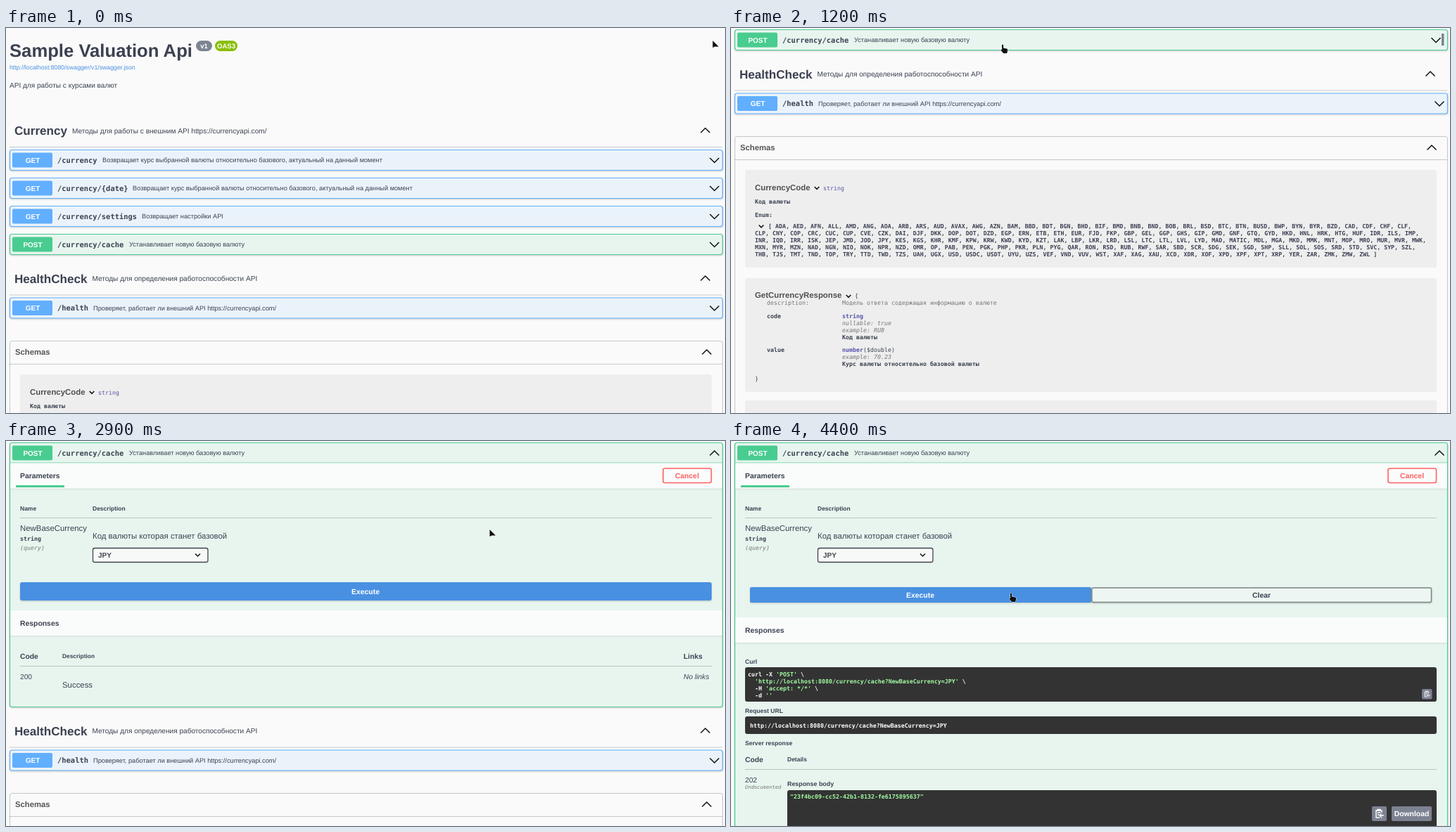
Animation of 1022 by 548 pixels, one loop 7200 ms. Source, as an HTML page:

```html
<!DOCTYPE html>
<html lang="ru">
<head>
<meta charset="utf-8">
<title>API</title>
<style>
html, body { margin: 0; width: 100%; height: 100%; overflow: hidden; background: #fafafa; }
svg { display: block; }
text { font-family: "Liberation Sans", Arial, sans-serif; fill: #3b4151; white-space: pre; text-rendering: geometricPrecision; }
.b { font-weight: 700; }
.i { font-style: italic; }
.m { font-family: "DejaVu Sans Mono", monospace; }
.c { text-anchor: middle; }
.w { fill: #fff; }
.g { fill: #777; }
.p { fill: #55a; }
.s { fill: #a2fca2; }
.chev { fill: none; stroke: #111; stroke-linecap: square; }
.op { stroke-width: 1.2; }
.hr { stroke: #3b4151; stroke-opacity: .28; }
.bar { fill: #fafcfb; filter: drop-shadow(0 1px 1px rgba(0,0,0,.1)); }
.shade { filter: drop-shadow(0 1px 1px rgba(0,0,0,.2)); }
</style>
</head>
<body>
<svg id="stage" width="1022" height="548" viewBox="0 0 1022 548"></svg>
<script>
const BLUE = '#61affe', GREEN = '#49cc90', INK = '#3b4151';
const CODES = ('ADA AED AFN ALL AMD ANG AOA ARB ARS AUD AVAX AWG AZN BAM BBD BDT BGN BHD BIF BMD BNB BND BOB BRL BSD BTC BTN BUSD BWP BYN BYR BZD CAD CDF CHF CLF ' +
  'CLP CNY COP CRC CUC CUP CVE CZK DAI DJF DKK DOP DOT DZD EGP ERN ETB ETH EUR FJD FKP GBP GEL GGP GHS GIP GMD GNF GTQ GYD HKD HNL HRK HTG HUF IDR ILS IMP ' +
  'INR IQD IRR ISK JEP JMD JOD JPY KES KGS KHR KMF KPW KRW KWD KYD KZT LAK LBP LKR LRD LSL LTC LTL LVL LYD MAD MATIC MDL MGA MKD MMK MNT MOP MRO MUR MVR MWK ' +
  'MXN MYR MZN NAD NGN NIO NOK NPR NZD OMR OP PAB PEN PGK PHP PKR PLN PYG QAR RON RSD RUB RWF SAR SBD SCR SDG SEK SGD SHP SLL SOL SOS SRD STD SVC SYP SZL ' +
  'THB TJS TMT TND TOP TRY TTD TWD TZS UAH UGX USD USDC USDT UYU UZS VEF VND VUV WST XAF XAG XAU XCD XDR XOF XPD XPF XPT XRP YER ZAR ZMK ZMW ZWL').split(' ');

// y is the middle of the capitals
const txt = (x, y, size, str, cls = '', more = '') =>
  `<text x="${x}" y="${Math.round(y + size * .36)}" font-size="${size}" class="${cls}" ${more}>${str}</text>`;
const mono = (x, y, str, cls = '') => txt(x, y, 8.3, str, 'm ' + cls);
const box = (x, y, w, h, fill, r = 0, more = '') =>
  `<rect x="${x}" y="${y}" width="${w}" height="${h}" rx="${r}" fill="${fill}" ${more}/>`;
const rule = (x1, x2, y) => `<path class="hr" d="M${x1} ${y}H${x2}"/>`;
const chev = (x, y, dir, w = 6, line = 1.5) =>
  `<path class="chev" stroke-width="${line}" d="M${x - w} ${y - dir * w / 2}l${w} ${dir * w}l${w} ${-dir * w}"/>`;
const group = (id, body) => `<g id="${id}">${body}</g>`;

// lines of codes, each beginning at one of the given codes
function linesFrom(starts) {
  const at = starts.map(s => CODES.indexOf(s));
  return at.map((a, n) => CODES.slice(a, at[n + 1]).join(', ') + (n < at.length - 1 ? ',' : ''));
}

function tag(y, name, x, about) {
  return txt(12, y, 17.1, name, 'b') + txt(x, y, 10.1, about) + chev(994, y - .5, -1) + rule(5, 1018, y + 23.5);
}

function summary(y, verb, color, path, x, about) {
  return box(9, y - 10.5, 57, 21, color, 2) + txt(38, y, 10, verb, 'b c w') +
    txt(73, y, 10.45, path, 'b m') + txt(x, y, 9.23, about);
}

function getOp(y, path, x, about) {
  return box(5.5, y - 14.5, 1013, 29, '#ebf3fa', 3, `class="op shade" stroke="${BLUE}"`) +
    summary(y, 'GET', BLUE, path, x, about) + chev(1007, y + .5, 1);
}

function copyIcon(x, y, size) {
  const k = size / 21;
  return box(x, y, size, size, '#7d8293', 2) +
    `<g transform="translate(${x} ${y}) scale(${k})" fill="none" stroke="#fff" stroke-width="1.4">
     <path d="M14 9V6H6v10h5M8 6V4.5h4V6M8 9h4M8 12h2M17 13h-6m2.5-2.5L11 13l2.5 2.5M14 16v1"/></g>`;
}

const select = (y, ink, fill) => box(123.5, y - 10, 163.5, 20, fill, 2.5, `stroke="${ink}" stroke-width="1.3"`) +
  txt(131, y, 10, 'JPY', 'b', `style="fill:${ink}"`) + chev(272.5, y, 1, 3);

const bar = (y, title) => box(6, y - 18, 1012, 36, '', 0, 'class="bar"') + txt(20, y, 10.4, title, 'b');

function models() {
  const gray = '#eee', list = linesFrom(['ADA', 'CLP', 'INR', 'MXN', 'THB']);
  list[0] = '[ ' + list[0];
  list[4] += ' ]';
  return box(5.5, 445.5, 1013, 700, 'none', 3, 'class="hr"') + txt(13, 460.5, 11.3, 'Schemas', 'b', 'style="fill:#555"') +
    chev(996, 461, -1) + rule(5, 1018, 478.5) +
    box(20, 493, 983, 139, gray, 3) + txt(34, 517.5, 11.4, 'CurrencyCode', 'b', 'style="fill:#505050"') +
    chev(122, 519, 1, 2.8) + mono(131, 519, 'string', 'p') + mono(34, 538, 'Код валюты', 'b') + mono(34, 557, 'Enum:', 'b') +
    chev(43, 573.5, 1, 2.8) + list.map((l, n) => mono(n ? 34 : 53, 573 + n * 10, l, 'b')).join('') +
    box(20, 647, 983, 162, gray, 3) + txt(34, 671, 11.4, 'GetCurrencyResponse', 'b', 'style="fill:#505050"') +
    chev(167, 673, 1, 2.8) + mono(176, 672.5, '{') +
    mono(51, 682.5, 'description:', 'g') + mono(158, 682.5, 'Модель ответа содержащая информацию о валюте', 'g') +
    mono(51, 701, 'code', 'b') + mono(158, 701, 'string', 'p b') + mono(158, 711, 'nullable: true', 'i g') +
    mono(158, 721, 'example: RUB', 'i g') + mono(158, 731, 'Код валюты', 'b') +
    mono(51, 749, 'value', 'b') + mono(158, 749, '<tspan class="p b">number</tspan>($double)') +
    mono(158, 759, 'example: 70.23', 'i g') + mono(158, 769, 'Курс валюты относительно базовой валюты', 'b') +
    mono(34, 790, '}') + box(20, 821, 983, 300, gray, 3);
}

const rateText = 'Возвращает курс выбранной валюты относительно базового, актуальный на данный момент';
const page =
  txt(5, 32, 25.67, 'Sample Valuation Api', 'b') +
  box(270, 18, 23, 15, '#7d8492', 7.5) + txt(281.5, 25.5, 9.6, 'v1', 'b c w') +
  box(297, 18, 32, 15, '#89bf04', 7.5) + txt(313, 25.5, 9.6, 'OAS3', 'b c w') +
  txt(5, 55.5, 8.74, 'http://localhost:8080/swagger/v1/swagger.json', '', 'style="fill:#4990e2"') +
  txt(5, 81.5, 10.05, 'API для работы с курсами валют') +
  tag(146, 'Currency', 94, 'Методы для работы с внешним API https://currencyapi.com/') +
  getOp(188, '/currency', 137, rateText) + getOp(228, '/currency/{date}', 180, rateText) +
  getOp(268, '/currency/settings', 193, 'Возвращает настройки API') +
  box(5.5, 293.5, 1013, 29, '#e8f5ef', 3, `id="post" class="op shade" stroke="${GREEN}"`) +
  summary(308, 'POST', GREEN, '/currency/cache', 175, 'Устанавливает новую базовую валюту') +
  group('postDown', chev(1007, 308.5, 1)) + group('postUp', chev(1007, 308, -1)) +
  group('tail', tag(356.5, 'HealthCheck', 122.5, 'Методы для определения работоспособности API') +
    getOp(398.5, '/health', 124, 'Проверяет, работает ли внешний API https://currencyapi.com/') + models());

const params = `<path d="M6 31H1018" stroke="${GREEN}" stroke-opacity=".75"/>` + bar(49.5, 'Parameters') +
  box(14, 63, 69, 3, GREEN) + txt(20, 95.5, 8.5, 'Name', 'b') + txt(123, 95.5, 8.5, 'Description', 'b') +
  rule(20, 1003, 109.5) + txt(20, 124, 11.4, 'NewBaseCurrency') + mono(20, 139, 'string', 'b') + mono(20, 152, '(query)', 'i g') +
  txt(123, 135, 11.4, 'Код валюты которая станет базовой');

const sansLines = linesFrom(['ADA', 'BTN', 'FKP', 'KPW', 'MZN', 'SOL', 'XAU']);
sansLines[0] = '<tspan class="i">Available values</tspan> : ' + sansLines[0];
const view = box(925.5, 39, 77, 20.5, '#fafcfb', 2.5, 'class="shade" stroke="#60656d" stroke-width="1.5"') +
  txt(964.5, 49, 10, 'Try it out', 'b c') + sansLines.map((l, n) => txt(123, 159.5 + n * 12.85, 11.35, l)).join('') +
  txt(123, 261, 11.35, '<tspan class="i">Example</tspan> : jpy') + select(288, '#7d8482', '#f0f6f3');

const cancel = box(934, 39, 68.5, 20.5, 'none', 2.5, 'stroke="#ff6060" stroke-width="1.6"') +
  txt(968, 49, 10.4, 'Cancel', 'b c', 'style="fill:#ff6060"') + select(162.5, '#41444e', '#f7f9f8');

const execute = box(20, 201, 983, 26, '#4990e2', 3, 'class="shade"') + txt(511, 214, 10.4, 'Execute', 'b c w');

const loader = `<circle cx="511.5" cy="281.5" r="20.5" fill="none" stroke="#555" stroke-opacity=".12" stroke-width="1.6"/>
  <path id="arc" d="M497 267a20.5 20.5 0 0 1 29 0" fill="none" stroke="#555" stroke-opacity=".8" stroke-width="1.6"/>` +
  txt(511.5, 281.5, 7.15, 'LOADING', 'b c');

const responses = bar(0, 'Responses') + group('table', txt(20, 47, 10.3, 'Code', 'b') + txt(80, 47, 8.4, 'Description', 'b') +
  txt(963, 47, 10.3, 'Links', 'b') + rule(20, 1003, 61.5) + txt(20, 76, 10.2, '200') +
  txt(80, 87.5, 11.4, 'Success') + txt(963, 76, 10.3, 'No links', 'i'));

const url = 'http://localhost:8080/currency/cache?NewBaseCurrency=JPY';
const str = s => `<tspan class="s">${s}</tspan>`;
const done = box(27, 208, 485, 22, '#4990e2', 2, 'class="shade"') + txt(269, 219, 10.4, 'Execute', 'b c w') +
  box(513, 209, 482.5, 20.5, '#edf6f2', 2, 'class="shade" stroke="#7d8482" stroke-width="1.5"') + txt(754, 219, 10.4, 'Clear', 'b c') +
  txt(20, 314, 8.6, 'Curl', 'b') + box(20, 322, 983, 49, '#333', 3) +
  [`curl -X ${str("'POST'")} \\`, `  ${str(`'${url}'`)} \\`, `  -H ${str("'accept: */*'")} \\`, `  -d ${str("''")}`]
    .map((l, n) => mono(24, 332 + n * 10, l, 'b w')).join('') + copyIcon(982, 353, 14.5) +
  txt(20, 384, 8.6, 'Request URL', 'b') + box(20, 392, 983, 25, '#333', 3) + mono(27, 405, url, 'b w') +
  txt(20, 429.5, 8.6, 'Server response', 'b') + txt(20, 453, 10.3, 'Code', 'b') + txt(80, 453, 8.5, 'Details', 'b') +
  rule(20, 1003, 467.5) + txt(20, 482, 10.2, '202') + txt(20, 492, 7.1, 'Undocumented', 'm i g') +
  txt(80, 488, 8.9, 'Response body', 'b') + box(80, 497, 923, 80, '#333', 3) +
  mono(84, 506, '"23f4bc09-cc52-42b1-8132-fe6175895637"', 'b s') + copyIcon(911, 520, 21) +
  box(939, 520, 57, 21, '#7d8293', 2) + txt(967.5, 530.5, 10.4, 'Download', 'b c w');

const pointers =
  '<path id="arrow" d="M.5 0V10L3.5 8.5H9Z"/>' +
  '<path id="hand" d="M2 1q1.5-1 2.2.5v4l5 1q1.4.6 1 2.5l-1 4h-5L.6 8.8q0-1.6 1.6-1z"/>' +
  '<path id="cross" d="M2.5 1L5 3.5 7.5 1 10 3.5 7.5 6 10 8.500 7.5 11 5 8.500 2.500 11 0 8.500 2.500 6 0 3.500Z"/>';

document.getElementById('stage').innerHTML = group('page', page) +
  box(1010, 8, 3.5, 17, '#7d8492', 0, 'id="thumb"') +
  group('params', params) + group('view', view) + group('cancel', cancel) + group('responses', responses) +
  group('execute', execute) + group('loader', loader) + group('done', done) +
  `<g id="pointer" fill="#111" stroke="#fff" stroke-width=".9" paint-order="stroke">${pointers}</g>`;

const el = {};
document.querySelectorAll('[id]').forEach(e => el[e.id] = e);
const show = (id, on) => el[id].style.display = on ? '' : 'none';
const move = (id, x, y) => el[id].setAttribute('transform', `translate(${x} ${y})`);

const scrollKeys = [[600, 0], [900, 170], [1000, 230], [1100, 275], [1200, 291]];
const pointerKeys = [[0, 1004, 18], [100, 930, 27], [300, 590, 32], [500, 384, 26], [1100, 384, 26], [1200, 383, 23],
  [1600, 383, 23], [2200, 946, 46], [2600, 946, 46], [3000, 600, 152], [3300, 392, 209], [3600, 392, 209], [3800, 395, 216]];

function sample(keys, t) {
  const n = keys.findIndex(k => k[0] > t);
  if (n === 0) return keys[0].slice(1);
  if (n < 0) return keys[keys.length - 1].slice(1);
  const a = keys[n - 1], b = keys[n], f = (t - a[0]) / (b[0] - a[0]);
  return a.slice(1).map((v, i) => v + (b[i + 1] - v) * f);
}

// start time, name, extra height of the open block, middle of the responses bar
const stages = [[0, 'closed', 0, 0], [1500, 'view', 447, 359], [2600, 'edit', 347, 259], [3700, 'busy', 430, 342], [4400, 'done', 900, 269]];

function draw(now) {
  const t = Math.floor(now % 7200 / 100) * 100;
  const [, name, extra, barY] = stages.filter(s => s[0] <= t).pop();
  const open = name !== 'closed', editing = name === 'edit' || name === 'busy';
  const arriving = t >= 1200 && t < 1500;

  move('page', 0, -Math.round(sample(scrollKeys, t)[0]));
  move('tail', 0, extra);
  el.post.setAttribute('height', 29 + extra);
  move('postDown', arriving ? -5 : 0, 0);
  show('postDown', !open);
  show('postUp', open);
  show('thumb', arriving);

  show('params', open);
  show('view', name === 'view');
  show('cancel', editing || name === 'done');
  show('responses', open);
  move('responses', 0, barY);
  show('table', name !== 'done');
  show('execute', editing);
  el.execute.style.opacity = Math.max(.3, Math.min(1, 1 - (t - 3600) / 300 * .7));
  show('loader', name === 'busy');
  el.loader.style.opacity = Math.min(1, (t - 3600) / 500);
  el.arc.setAttribute('transform', `rotate(${205 + (t - 4100) * .36} 511.5 281.5)`);
  show('done', name === 'done');

  const cross = t >= 3600 && t < 3800;
  const hand = !cross && (t >= 1200 && t < 1700 || t >= 2200 && t < 2700 || t >= 3300);
  show('cross', cross);
  show('hand', hand);
  show('arrow', !cross && !hand);
  move('pointer', ...sample(pointerKeys, t).map(Math.round));
}

const begin = performance.now();
function tick() {
  draw(performance.now() - begin);
  requestAnimationFrame(tick);
}
tick();
</script>
</body>
</html>
```
